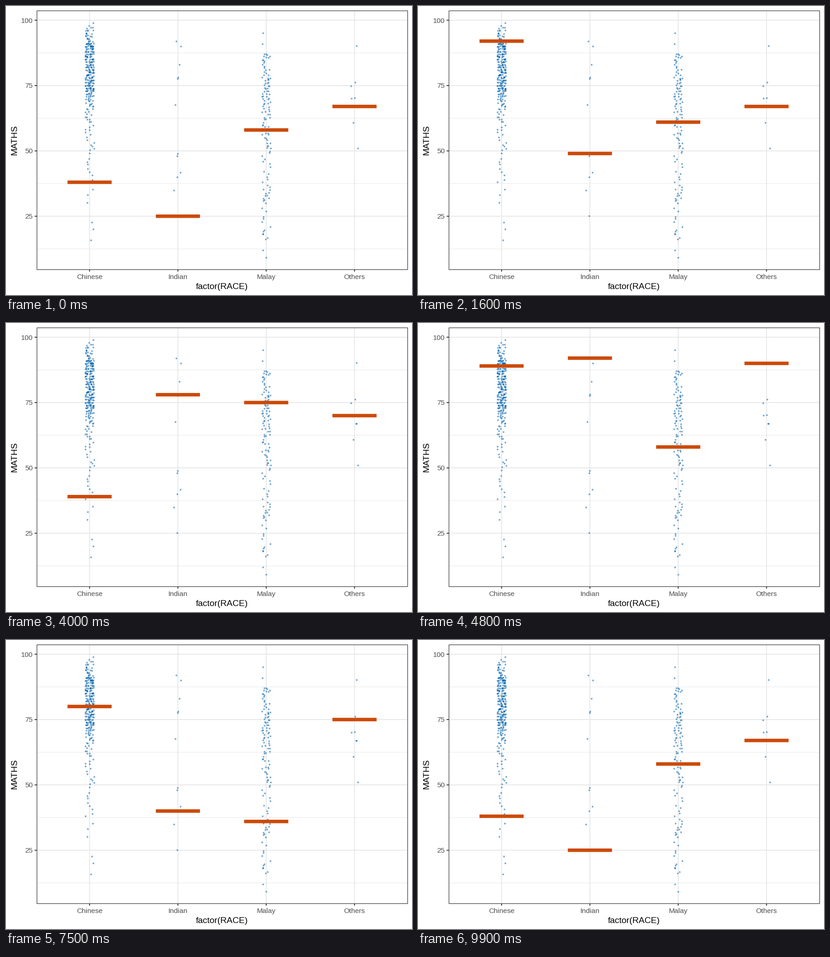
Write a matplotlib script that moves like this. It is 885 px wide and 632 px high and loops after 10000 ms.

```python
import numpy as np
import matplotlib.pyplot as plt
from matplotlib.animation import FuncAnimation
from matplotlib.patches import Rectangle

W, H, DPI = 885, 632, 100
PX = 72 / DPI                      # points per pixel
LEFT, RIGHT, TOP, BOTTOM = 67.2, 874.8, 10.4, 576.1
GRID, DARK, LABEL = "#e7e7e7", "#333333", "#4d4d4d"
BLUE, ORANGE = "#0061ac", "#cc4a08"
GROUPS = ["Chinese", "Indian", "Malay", "Others"]
CENTERS = 182.2 + 192.5 * np.arange(4)
BAR_W, BAR_H = 96.2, 7.6

plt.rcParams["font.family"] = "Liberation Sans"

# Sampled scores, one per draw
chinese_draws = [38, 97, 79, 79, 92, 74, 85, 77, 92, 87, 39, 85, 89,
                 87, 74, 83, 71, 79, 74, 80, 72, 78, 85, 74, 82]
indian_draws = [25, 78, 40, 78, 49, 78, 90, 40, 83, 68, 78, 48, 92,
                68, 49, 68, 78, 90, 25, 40, 68, 90, 40, 40, 92]
malay_draws = [58, 9, 68, 75, 61, 32, 65, 75, 70, 74, 75, 21, 58,
               66, 19, 75, 62, 44, 66, 36, 65, 41, 75, 79, 65]
other_draws = [67, 70, 75, 90, 67, 70, 61, 76, 67, 61, 70, 75, 90,
               70, 76, 76, 61, 67, 70, 75, 67, 61, 75, 76, 70]
DRAWS = np.column_stack([chinese_draws, indian_draws, malay_draws,
                         other_draws])

# Small groups: (sideways offset in pixels, score)
indian_points = [(-4, 92), (6.2, 90.1), (3.4, 83), (.5, 78.1), (-.3, 77.7),
                 (-5.8, 67.7), (-.5, 48.9), (-2.2, 48), (5.2, 41.8),
                 (-2, 40), (-8.4, 34.9), (-1.8, 25.2)]
other_points = [(4.2, 90.2), (1, 76.2), (-8.2, 74.8), (-6.4, 70.1),
                (.2, 70.2), (3.2, 67), (4.2, 66.9), (-3, 60.8), (7, 51.1)]

# Large groups: (rank, score) knots of the sorted scores
chinese_knots = [(0, 16), (2, 23), (3, 30), (6, 38), (15, 50), (27, 60),
                 (36, 65), (52, 70), (69, 73), (83, 74), (138, 80),
                 (182, 85), (227, 90), (245, 91), (271, 97), (273, 99)]
malay_knots = [(0, 9), (2, 16), (6, 19), (11, 25), (14, 30), (25, 36),
               (38, 50), (52, 58), (60, 63), (77, 70), (92, 75), (104, 79),
               (116, 86), (122, 87), (124, 95)]


def score_y(score):
    return 31.1 + (100 - np.asarray(score)) * 5.715


def jittered(knots, rng):
    ranks, scores = zip(*knots)
    values = np.round(np.interp(np.arange(ranks[-1] + 1), ranks, scores))
    dx = rng.uniform(-9.6, 9.6, len(values))
    return np.column_stack([dx, values + rng.uniform(-.3, .3, len(values))])


fig = plt.figure(figsize=(W / DPI, H / DPI), dpi=DPI, facecolor="white")
ax = fig.add_axes([0, 0, 1, 1])
ax.set(xlim=(0, W), ylim=(H, 0))
ax.axis("off")


def line(x0, y0, x1, y1, color, width):
    ax.plot([x0, x1], [y0, y1], color=color, lw=width * PX,
            solid_capstyle="butt", snap=False, zorder=1)


def label(x, y, text, size, color, ha="center", rotation=0):
    ax.text(x, y, text, fontsize=size * PX, color=color, ha=ha, va="baseline",
            rotation=rotation, rotation_mode="anchor")


for score in (12.5, 37.5, 62.5, 87.5):
    line(LEFT, score_y(score), RIGHT, score_y(score), GRID, 0.95)
for score in (25, 50, 75, 100):
    y = score_y(score)
    line(LEFT, y, RIGHT, y, GRID, 1.87)
    line(LEFT - 4.8, y, LEFT, y, DARK, 1.87)
    label(58.2, y + 5.5, str(score), 15.4, LABEL, ha="right")
for x, name in zip(CENTERS, GROUPS):
    line(x, TOP, x, BOTTOM, GRID, 1.87)
    line(x, BOTTOM, x, BOTTOM + 4.8, DARK, 1.87)
    label(x, 596.7, name, 15.4, LABEL)
label((LEFT + RIGHT) / 2, 618.8, "factor(RACE)", 19.2, "black")
label(23.8, (TOP + BOTTOM) / 2, "MATHS", 19.2, "black", rotation=90)

rng = np.random.default_rng(7)
clouds = [jittered(chinese_knots, rng), np.array(indian_points),
          jittered(malay_knots, rng), np.array(other_points)]
for x, cloud in zip(CENTERS, clouds):
    ax.scatter(x + cloud[:, 0], score_y(cloud[:, 1]), s=(3.8 * PX) ** 2,
               color=BLUE, alpha=0.55, linewidths=0, zorder=2)

bars = [ax.add_patch(Rectangle((x - BAR_W / 2, 0), BAR_W, BAR_H, color=ORANGE,
                               lw=0, snap=False, zorder=3)) for x in CENTERS]
ax.add_patch(Rectangle((LEFT, TOP), RIGHT - LEFT, BOTTOM - TOP, fill=False,
                       ec=DARK, lw=1.2 * PX, zorder=4))


def update(frame):
    # Each draw holds three frames, then one halfway frame; the middle one is short
    step = frame if frame < 50 else frame + 1
    draw, phase = divmod(step, 4)
    now, after = DRAWS[draw % 25], DRAWS[(draw + 1) % 25]
    scores = (now + after) / 2 if phase == 3 else now
    for bar, score in zip(bars, scores):
        bar.set_y(score_y(score) - BAR_H / 2)
    return bars


anim = FuncAnimation(fig, update, frames=100, interval=100, repeat=True,
                     repeat_delay=0, blit=False)
plt.show()
```
